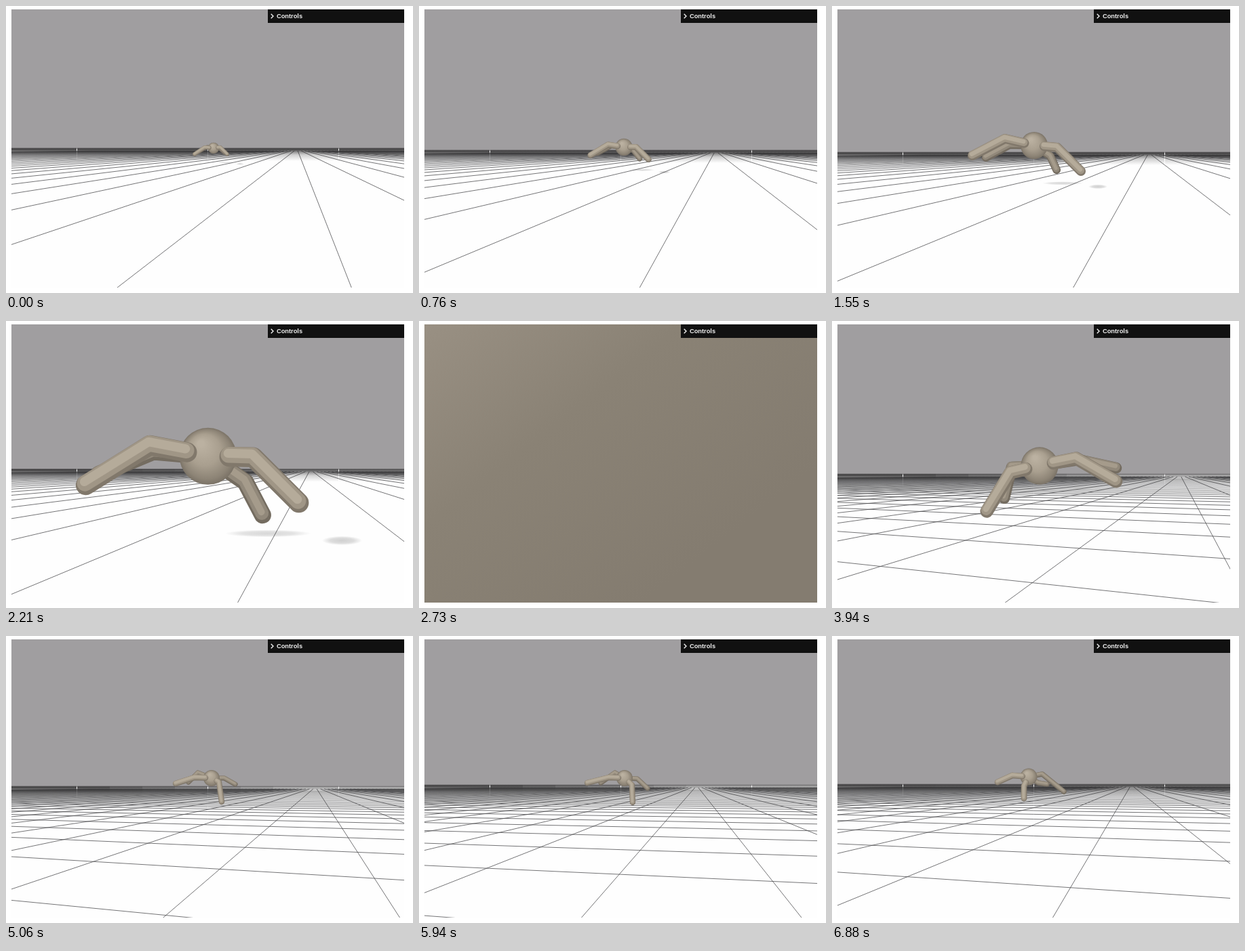
These frames come from a looping animation (600 by 424 pixels, 6910 ms). An HTML page with a canvas:

```html
<!DOCTYPE html>
<html lang="en">
<head>
<meta charset="utf-8">
<title>Ant runner</title>
<style>
  html, body { margin: 0; width: 100%; height: 100%; overflow: hidden; background: #fff; }
  canvas { position: absolute; left: 0; top: 0; width: 600px; height: 424px; }
  .bar {
    position: absolute; left: 386px; top: 5px; width: 201px; height: 20px;
    background: #111; color: #eee;
    font: bold 9.25px/20px "Liberation Sans", Arial, sans-serif;
  }
  .bar span { position: absolute; left: 13px; top: 0; }
  .bar svg { position: absolute; left: 0; top: 0; }
</style>
</head>
<body>
<canvas id="stage" width="600" height="424"></canvas>
<div class="bar">
  <svg width="12" height="20"><path d="M4.7 6.8 L8 10 L4.7 13.2" fill="none" stroke="#eee" stroke-width="1.4"/></svg>
  <span>Controls</span>
</div>
<script>
const ctx = document.getElementById('stage').getContext('2d');
const LOOP = 6910;
const VIEW = { x: 8, y: 5, w: 579, h: 411 };
const MID = 297.5, FOCAL = 565, TORSO = 0.25;
const RIGHT = VIEW.x + VIEW.w, BOTTOM = VIEW.y + VIEW.h;

const lerp = (a, b, u) => a + (b - a) * u;
const clamp = v => Math.max(0, Math.min(1, v));

// Legs in pixels around the torso: front left, front right, back left, back right;
// each is knee x, knee y, foot x, foot y. z is the depth they were measured at.
const pose = (z, ...px) => px.map(v => v * z / FOCAL);
const start  = pose(17, -13,-1,-28,9,  10,-1,20,9,  -9,-2,-21,5,  8,0,16,7);
const coming = pose(7.06, -43,-10,-91,15,  34,3,69,38,  -36,-1,-71,18,  24,16,33,36);
const going  = pose(5.1, -43,10,-78,67,  54,-11,113,23,  -41,2,-52,48,  58,-9,113,3);
const far1   = pose(11.8, -25,-1,-53,8,  11,6,15,35,  -20,-8,-34,6,  19,0,35,9);
const far2   = pose(11.8, -23,-1,-55,7,  11,10,12,36,  -14,-8,-35,7,  19,1,34,15);
const last   = pose(11.3, -24,-2,-46,8,  -7,14,-7,32,  14,9,27,11,  20,-4,52,22);

// Camera place (u, w) and height, horizon row, heading, then where the torso is seen.
function key(t, u, w, tall, horizon, deg, z, sx, sy, band, from, to) {
  const a = deg * Math.PI / 180, x = (sx - MID) * z / FOCAL;
  return {
    t, u, w, tall, horizon, sx, band, from, to,
    antU: u + Math.sin(a) * z + Math.cos(a) * x,
    antW: w + Math.cos(a) * z - Math.sin(a) * x,
    antH: tall + (horizon - sy) * z / FOCAL
  };
}
const PASS = 2820;
const keys = [
  key(0,    0.23, 1.87, 0.61, 211, 166.9, 17, 306, 210, 0.95, start, coming),
  key(1550, 0.70, 0.09, 0.56, 217, 163.3, 7.06, 298, 206, 0.95, coming, coming),
  key(PASS, 0.71, 0.11, 0.56, 222, -90, 0.2, 297.5, -60, 0.7, going, going),
  key(3940, 0.72, 0.135, 0.565, 227, -20.9, 5.1, 306, 214, 0.5, going, far1),
  key(5060, 0.645, 0.395, 0.575, 223, -15.7, 11.8, 303, 210, 0.45, far1, far2),
  key(5940, -0.475, 5.405, 0.613, 221, -11.2, 11.8, 303, 210, 0.5, far2, last),
  key(6880, -1.68, 10.93, 0.56, 220, -14.25, 11.3, 290, 208, 0.9, last, last)
];

// The camera catches up at first, stands still, then chases once the ant is far.
function chase(i, u) {
  if (i === 0) return 1 - Math.pow(1 - clamp(u / 0.35), 3);
  if (i === 3) return Math.pow(clamp((u - 0.85) / 0.15), 2);
  return u;
}

function stateAt(t) {
  let i = 0;
  while (i < keys.length - 2 && t >= keys[i + 1].t) i++;
  const a = keys[i], b = keys[i + 1];
  const p = clamp((t - a.t) / (b.t - a.t)), c = chase(i, p);
  const s = { t };
  for (const n of ['antU', 'antW', 'antH', 'horizon', 'sx', 'band']) s[n] = lerp(a[n], b[n], p);
  for (const n of ['u', 'w', 'tall']) s[n] = lerp(a[n], b[n], c);
  const du = s.antU - s.u, dw = s.antW - s.w;
  s.dist = Math.hypot(du, dw);
  s.turn = Math.atan2(du, dw) - Math.atan((s.sx - MID) / FOCAL);
  s.z = Math.max(0.1, du * Math.sin(s.turn) + dw * Math.cos(s.turn));
  s.y = s.horizon - (s.antH - s.tall) * FOCAL / s.z;
  const steps = Math.round((b.t - a.t) / 240);
  const swing = Math.sin(Math.PI * steps * p);
  s.legs = a.from.map((v, n) => {
    const leg = n >> 2, foot = n % 4 > 1;
    const sign = leg === 0 || leg === 3 ? 1 : -1;
    return lerp(v, a.to[n], p) + sign * swing * (foot ? 0.07 : 0.03);
  });
  return s;
}

function gridLine(nx, nz, e, s) {
  const k = FOCAL * s.tall;
  let x1, y1, x2, y2, alpha;
  if (Math.abs(nx) < 0.6) {
    if (e < 0.02) return;
    const drop = x => k * ((x - MID) / FOCAL * nx + nz) / e;
    x1 = VIEW.x; x2 = RIGHT;
    y1 = drop(x1); y2 = drop(x2);
    const m = (y1 + y2) / 2;
    if (m < 5) return;
    alpha = Math.min(1, m * m / k / 2.2);
  } else {
    const across = d => MID + FOCAL * (d * e / k - nz) / nx;
    y1 = 3; y2 = 240;
    x1 = across(y1); x2 = across(y2);
    alpha = Math.min(1, 9 / (Math.abs(e) + 0.01));
  }
  ctx.globalAlpha = alpha;
  ctx.beginPath();
  ctx.moveTo(x1, s.horizon + y1);
  ctx.lineTo(x2, s.horizon + y2);
  ctx.stroke();
}

function drawFloor(s) {
  ctx.fillStyle = '#a09ea0';
  ctx.fillRect(VIEW.x, VIEW.y, VIEW.w, VIEW.h);
  ctx.fillStyle = '#fefefe';
  ctx.fillRect(VIEW.x, s.horizon, VIEW.w, BOTTOM - s.horizon);

  ctx.save();
  ctx.beginPath();
  ctx.rect(VIEW.x, s.horizon, VIEW.w, BOTTOM - s.horizon);
  ctx.clip();
  ctx.strokeStyle = 'rgba(70,70,72,0.75)';
  ctx.lineWidth = 1;
  const sin = Math.sin(s.turn), cos = Math.cos(s.turn);
  for (let k = -60; k <= 60; k++) {
    gridLine(cos, sin, Math.floor(s.u) + k - s.u, s);
    gridLine(-sin, cos, Math.floor(s.w) + k - s.w, s);
  }
  ctx.restore();

  // Far lines merge into a dark band, weaker on the right.
  const strips = 12, step = VIEW.w / strips;
  for (let i = 0; i < strips; i++) {
    const f = lerp(0.95, s.band, clamp((i - 2) / 6));
    const g = ctx.createLinearGradient(0, s.horizon - 2, 0, s.horizon + 18);
    for (const [at, a] of [[0, 0], [0.1, 0.9], [0.2, 0.78], [0.35, 0.48], [0.55, 0.22], [1, 0]])
      g.addColorStop(at, `rgba(32,31,32,${a * f})`);
    ctx.fillStyle = g;
    ctx.fillRect(Math.round(VIEW.x + i * step), s.horizon - 2, Math.round(step), 20);
  }
}

function drawShadow(s, r) {
  if (s.t > PASS) return;
  const y = s.horizon + FOCAL * s.tall / s.z;
  for (const [x, dy, rx, ry, a] of [[2.1, 0, 1.5, 0.13, 0.2], [4.7, 0.25, 0.7, 0.16, 0.24]]) {
    ctx.save();
    ctx.translate(s.sx + x * r, y + dy * r);
    ctx.scale(rx * r, ry * r);
    const g = ctx.createRadialGradient(0, 0, 0, 0, 0, 1);
    g.addColorStop(0, `rgba(60,60,60,${a})`);
    g.addColorStop(0.6, `rgba(60,60,60,${a * 0.7})`);
    g.addColorStop(1, 'rgba(60,60,60,0)');
    ctx.fillStyle = g;
    ctx.beginPath();
    ctx.arc(0, 0, 1, 0, 7);
    ctx.fill();
    ctx.restore();
  }
}

function drawLeg(s, n, scale, r, near) {
  const [kx, ky, fx, fy] = s.legs.slice(n * 4, n * 4 + 4).map(v => v * scale);
  const len = Math.hypot(kx, ky) || 1, hip = Math.min(0.75 * r / len, 0.7);
  const w = r * (near ? 0.7 : 0.6);
  const tones = near
    ? [['#81786b', 1, 0], ['#a09686', 0.8, 0.09], ['#b5ab9a', 0.45, 0.17]]
    : [['#746c60', 1, 0], ['#91887a', 0.78, 0.1], ['#a59b8b', 0.4, 0.18]];
  ctx.lineCap = ctx.lineJoin = 'round';
  for (const [color, size, lift] of tones) {
    ctx.strokeStyle = color;
    ctx.lineWidth = w * size;
    const up = s.y - lift * w, left = s.sx - lift * w * 0.4;
    ctx.beginPath();
    ctx.moveTo(left + kx * hip, up + ky * hip);
    ctx.lineTo(left + kx, up + ky);
    ctx.lineTo(left + fx, up + fy);
    ctx.stroke();
  }
}

function drawTorso(s, r) {
  const g = ctx.createRadialGradient(s.sx - r * 0.25, s.y - r * 0.45, r * 0.1, s.sx, s.y, r);
  g.addColorStop(0, '#bbb1a1');
  g.addColorStop(0.5, '#a99f8f');
  g.addColorStop(0.85, '#8d8476');
  g.addColorStop(1, '#7a7266');
  ctx.fillStyle = g;
  ctx.beginPath();
  ctx.arc(s.sx, s.y, r, 0, 7);
  ctx.fill();
}

function drawInside() {
  const g = ctx.createLinearGradient(VIEW.x, VIEW.y, 330, BOTTOM);
  g.addColorStop(0, '#999083');
  g.addColorStop(0.45, '#8a8275');
  g.addColorStop(1, '#847c70');
  ctx.fillStyle = g;
  ctx.fillRect(VIEW.x, VIEW.y, VIEW.w, VIEW.h);
}

function draw(t) {
  const s = stateAt(t);
  ctx.fillStyle = '#fff';
  ctx.fillRect(0, 0, 600, 424);
  ctx.save();
  ctx.beginPath();
  ctx.rect(VIEW.x, VIEW.y, VIEW.w, VIEW.h);
  ctx.clip();
  if (s.dist < 0.62) {
    drawInside();
  } else {
    const scale = FOCAL / s.z, r = TORSO * scale;
    drawFloor(s);
    drawShadow(s, r);
    drawLeg(s, 2, scale, r, false);
    drawLeg(s, 3, scale, r, false);
    drawTorso(s, r);
    drawLeg(s, 0, scale, r, true);
    drawLeg(s, 1, scale, r, true);
  }
  ctx.restore();
}

const begin = performance.now();
function tick() {
  draw((performance.now() - begin) % LOOP);
  requestAnimationFrame(tick);
}
tick();
</script>
</body>
</html>
```
